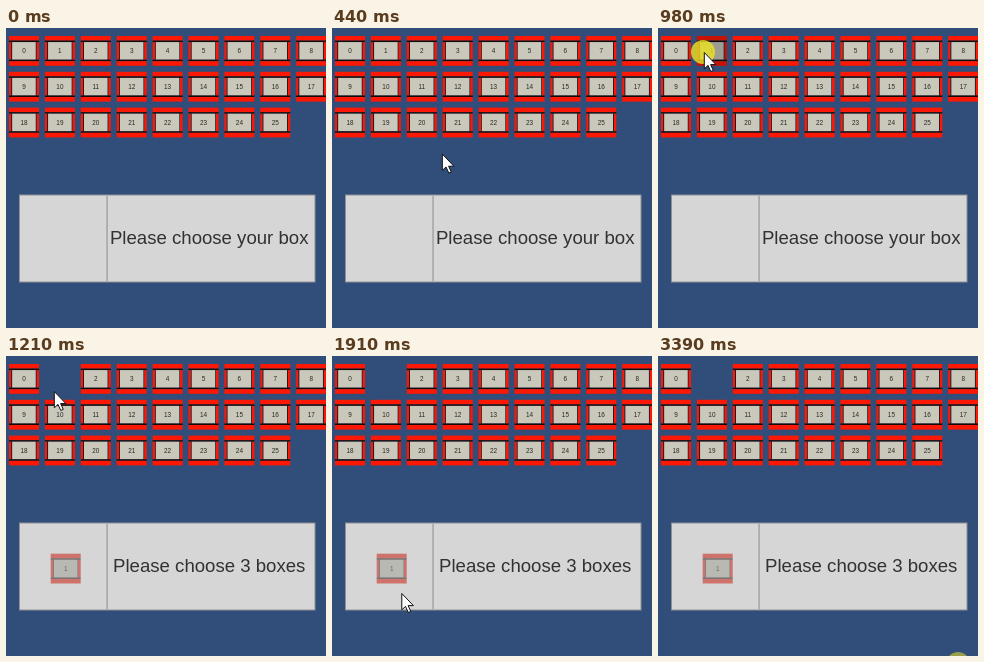
Write an HTML page with a canvas that moves like this. It is 320 px wide and 300 px high and loops after 3470 ms.

```html
<!DOCTYPE html>
<html lang="en">
<head>
<meta charset="utf-8">
<title>Choose your box</title>
<style>
  html, body { margin: 0; width: 100%; height: 100%; overflow: hidden; background: #314d79; }
  canvas { display: block; width: 320px; height: 300px; }
</style>
</head>
<body>
<canvas id="stage" width="320" height="300"></canvas>
<script>
const ctx = document.getElementById('stage').getContext('2d');
const LOOP = 3470;
const FONT = '"Liberation Sans", Arial, sans-serif';
const PICKED = 1;
const PICK_TIME = 1130;
const ARROW = [[0, 0], [0, 16.3], [3.7, 12.9], [6.5, 19], [9, 17.9], [6.3, 12.1], [11.6, 12.1]];

const lerp = (a, b, p) => a + (b - a) * p;
const mix = (a, b, p) => [lerp(a[0], b[0], p), lerp(a[1], b[1], p)];
const smooth = p => p * p * (3 - 2 * p);

// Index of the last step taken among n evenly spaced steps, -1 before the first
function stepAt(t, first, last, n) {
  const i = Math.floor((t - first + 5) / ((last - first) / (n - 1)));
  return t < first ? -1 : Math.min(i, n - 1);
}

function rect(x, y, w, h, color) {
  ctx.fillStyle = color;
  ctx.fillRect(x, y, w, h);
}

function label(text, x, y, size, color) {
  ctx.font = size + 'px ' + FONT;
  ctx.textAlign = 'center';
  ctx.fillStyle = color;
  ctx.fillText(text, x, y);
}

function drawBox(n, x, y, tint = 1, alpha = 1) {
  const shade = (r, g, b) => `rgb(${r * tint}, ${g * tint}, ${b * tint})`;
  const red = shade(252, 24, 4);
  const black = shade(22, 10, 8);
  ctx.save();
  ctx.globalAlpha = alpha;
  rect(x, y, 30, 4.6, red);
  rect(x, y + 4.6, 30, 1.5, black);
  rect(x, y + 6.1, 2.4, 17.6, red);
  rect(x + 27.4, y + 6.1, 2.6, 17.6, red);
  rect(x + 2.4, y + 6.1, 0.8, 17.6, black);
  rect(x + 26.7, y + 6.1, 0.7, 17.6, black);
  rect(x + 3.2, y + 6.1, 23.5, 17.6, shade(202, 200, 186));
  rect(x, y + 23.7, 30, 1.5, black);
  rect(x, y + 25.2, 30, 4.6, red);
  label(n, x + 15, y + 17.3, 6.4, shade(40, 40, 38));
  ctx.restore();
}

function drawGrid(t) {
  for (let n = 0; n < 26; n++) {
    if (n === PICKED && t >= PICK_TIME) continue;
    const pressed = n === PICKED && t >= 900;
    drawBox(n, 3 + (n % 9) * 35.9, 8 + Math.floor(n / 9) * 35.8, pressed ? 0.784 : 1);
  }
}

function drawPanel(t) {
  const picked = t >= PICK_TIME;
  rect(13, 166.5, 296.5, 88, '#8f9193');
  rect(14, 167.5, 294.5, 86, '#d6d6d6');
  rect(100.3, 167.5, 1.5, 86, '#a2a4a8');
  if (picked) drawBox(PICKED, 44.7, 197.7, 0.784, 0.5);
  label(picked ? 'Please choose 3 boxes' : 'Please choose your box', 203.2, 216, 18.6, '#323232');
}

function drawClick(x, y, alpha) {
  ctx.globalAlpha = alpha;
  ctx.fillStyle = 'rgb(238, 228, 34)';
  ctx.beginPath();
  ctx.arc(x, y, 12, 0, Math.PI * 2);
  ctx.fill();
  ctx.globalAlpha = 1;
}

function pointerAt(t) {
  if (t < 670) {
    const p = stepAt(t, 70, 590, 8) / 7;
    return [lerp(231, 48, p ** 1.23), lerp(269, 37, p ** 1.43)];
  }
  if (t < 1130) return t < 750 ? [47, 30] : [46, 24];
  if (t < 1210) return [47, 29];
  const p = (stepAt(t, 1680, 1910, 4) + 1) / 4;
  return mix([48, 35], [69.5, 237], smooth(p));
}

function drawPointer(t) {
  if (t < 70 || t >= 2610) return;
  const [x, y] = pointerAt(t);
  ctx.save();
  ctx.globalAlpha = 1 - (stepAt(t, 2460, 2610, 3) + 1) / 3;
  ctx.translate(x + 0.3, y + 0.5);
  ctx.beginPath();
  ARROW.forEach(p => ctx.lineTo(...p));
  ctx.closePath();
  ctx.fillStyle = '#fff';
  ctx.fill();
  ctx.lineWidth = 1;
  ctx.strokeStyle = '#111';
  ctx.stroke();
  ctx.restore();
}

function draw(t) {
  rect(0, 0, 320, 300, '#314d79');
  drawGrid(t);
  drawPanel(t);
  if (t >= 900 && t < PICK_TIME) drawClick(45, 24, t >= 980 && t < 1060 ? 0.8 : 0.5);
  if (t >= 3390) drawClick(300, 308, 0.55);
  drawPointer(t);
}

const start = performance.now();
function tick() {
  draw((performance.now() - start) % LOOP);
  requestAnimationFrame(tick);
}
tick();
</script>
</body>
</html>
```
